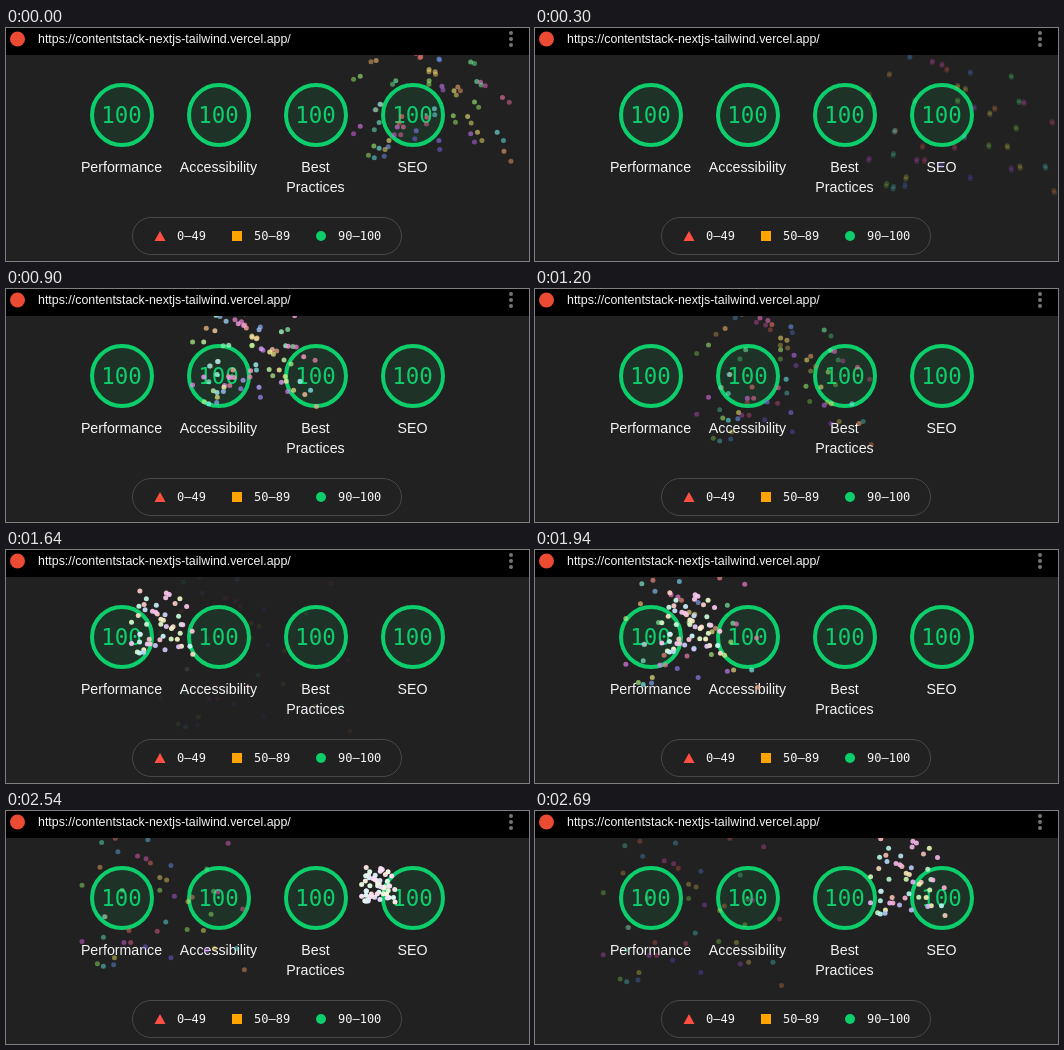
These frames come from a looping animation (523x233 px, 2790 ms). An HTML page with a canvas:

```html
<!DOCTYPE html>
<html lang="en">
<head>
<meta charset="utf-8">
<title>Audit scores</title>
<style>
  html, body { margin: 0; width: 100%; height: 100%; overflow: hidden; background: #212121; }
  svg, canvas { position: absolute; left: 0; top: 0; }
  text { font-family: "Liberation Sans", Arial, sans-serif; font-size: 14.2px; fill: #f5f5f5; }
  .mid { text-anchor: middle; }
  .url { font-size: 12.4px; }
  .score { font: 22.4px "DejaVu Sans Mono", monospace; fill: #0cce6b; }
  .range { font: 12px "DejaVu Sans Mono", monospace; }
</style>
</head>
<body>
<svg width="523" height="233">
  <rect width="523" height="27"/>
  <circle cx="11.5" cy="11" r="7.5" fill="#eb4b33"/>
  <text class="url" x="32" y="15">https://contentstack-nextjs-tailwind.vercel.app/</text>
  <g fill="#757575"><circle cx="505" cy="5" r="2"/><circle cx="505" cy="11" r="2"/><circle cx="505" cy="17" r="2"/></g>
  <g id="gauges"></g>
  <rect x="126.5" y="189.5" width="269" height="37" rx="18.5" fill="none" stroke="#484848"/>
  <path d="M154 203l5.5 10h-11z" fill="#ff4e42"/>
  <rect x="226" y="203" width="10" height="10" fill="#ffa400"/>
  <circle cx="315" cy="208" r="5" fill="#0cce6b"/>
  <text class="range" x="171" y="212">0–49</text>
  <text class="range" x="248" y="212">50–89</text>
  <text class="range" x="332" y="212">90–100</text>
</svg>
<canvas id="sky" width="523" height="233"></canvas>
<script>
const LOOP = 2790;

const labels = [['Performance'], ['Accessibility'], ['Best', 'Practices'], ['SEO']];
document.getElementById('gauges').innerHTML = labels.map((lines, i) => {
  const x = 116 + 97 * i;
  return `<circle cx="${x}" cy="87" r="30" fill="#1f3228" stroke="#0cce6b" stroke-width="4"/>
    <text class="score mid" x="${x - 0.5}" y="95">100</text>` +
    lines.map((s, n) => `<text class="mid" x="${x - 0.5}" y="${144 + 20 * n}">${s}</text>`).join('');
}).join('');

// Sparks by hue: final x, y offsets of each
const sparks = [
  [6, 42, -124, -38, -13, -13, -92, -67, -163, -54, -121],
  [22, 36, -52, 97, 33],
  [33, -72, -87],
  [43, 6, -72],
  [51, -2, -75, 62, 8],
  [57, -66, -29, 31, -47, -55, 19, 49, -13],
  [80, 57, -139],
  [98, 58, -32, -93, -66, 30, -14, -2, -60, -75, 26],
  [140, 53, -85, 61, -59, -46, -60],
  [163, -70, -116, -47, -139, -68, -5],
  [180, 5, -23, -68, 29, 88, 8],
  [197, -16, -119, -67, -29],
  [208, -51, -105],
  [220, -56, 27, 11, -89],
  [250, -19, 6, 11, 19],
  [277, 15, -53, 53, 10],
  [296, -93, 0, -44, 1],
  [304, 24, -152],
  [316, 13, -142, 66, -58, 78, -115, 15, -157, -18, -97, -28, -100],
  [336, -36, 1, -5, -12, 95, -38],
];

const spots = [[424.6, 66.5], [247.2, 73], [155.5, 88], [372, 83.5]];
// Two shells share the spots, each with its own period
const shells = [{ start: -570, span: 1000 }, { start: -810, span: 1250 }];

// CSS-style cubic Bezier easing with control points (x1, 0) and (x2, 1)
const bezier = (x1, x2) => u => {
  let lo = 0, hi = 1, t;
  for (let i = 0; i < 24; i++) {
    t = (lo + hi) / 2;
    const x = 3 * (1 - t) ** 2 * t * x1 + 3 * (1 - t) * t * t * x2 + t ** 3;
    if (x < u) lo = t; else hi = t;
  }
  return t * t * (3 - 2 * t);
};
const easeIn = bezier(0.42, 1), easeOut = bezier(0, 0.58);

const ctx = document.getElementById('sky').getContext('2d');
ctx.beginPath();
ctx.rect(0, 27, 523, 206);
ctx.clip();

function burst([cx, cy], u) {
  const spread = easeOut(u), fall = easeIn(u);
  ctx.globalAlpha = 1 - fall;
  for (const [hue, ...pts] of sparks) {
    ctx.fillStyle = `color-mix(in srgb, hsl(${hue} 80% 60%) ${spread * 100}%, white)`;
    for (let i = 0; i < pts.length; i += 2) {
      ctx.beginPath();
      ctx.arc(cx + pts[i] * spread, cy + (pts[i + 1] + 0.33) * spread + 80 * fall, 2.5, 0, 7);
      ctx.fill();
    }
  }
}

// The picture advances in 150 ms steps, with one step 10 ms short
function step(t) {
  const skip = t < 1490 ? 0 : 10;
  return Math.floor((t + skip) / 150) * 150 - skip;
}

function draw(now) {
  const t = step(now % LOOP);
  ctx.clearRect(0, 0, 523, 233);
  for (const { start, span } of shells) {
    const age = (t - start) / span;
    burst(spots[Math.floor(age)], age % 1);
  }
  requestAnimationFrame(draw);
}
requestAnimationFrame(draw);
</script>
</body>
</html>
```
